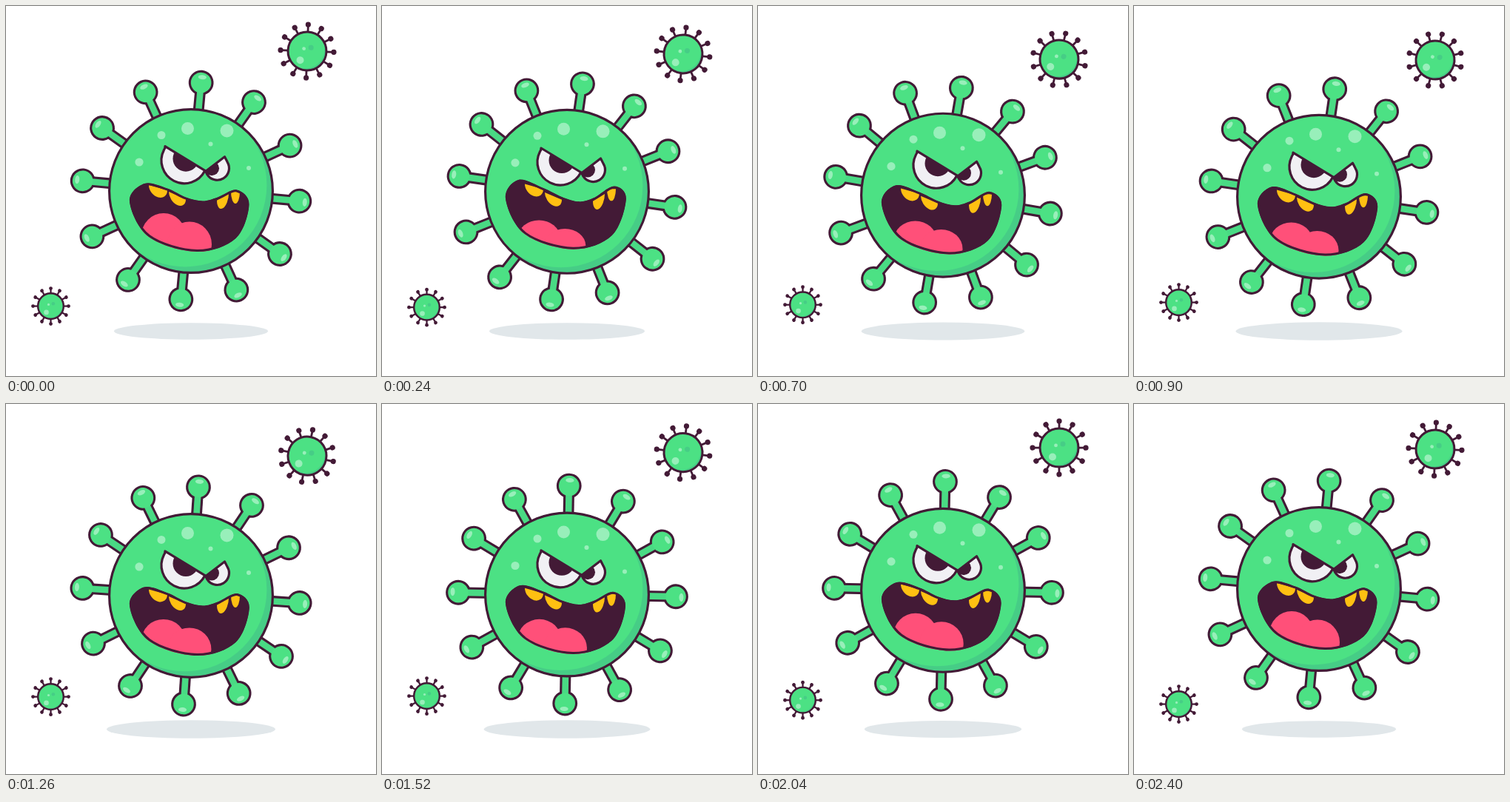
An HTML page with a canvas that plays this animation: 500 px wide and 500 px high, repeating every 2.42 s.

```html
<!DOCTYPE html>
<html lang="en">
<head>
<meta charset="utf-8">
<title>Virus</title>
<style>
  html, body { margin: 0; width: 100%; height: 100%; overflow: hidden; background: #fff; }
  canvas { display: block; width: 500px; height: 500px; }
</style>
</head>
<body>
<canvas id="stage" width="500" height="500"></canvas>
<script>
const ctx = document.getElementById('stage').getContext('2d');
const TAU = Math.PI * 2;
const LOOP = 2420, CYCLE = 2400, STEP = 20;
const INK = '#431a36', GREEN = '#4ce184', STEM = '#49da84', SHADE = '#46cd86', LIGHT = '#98efba';
const WHITE = '#f1f0f4', YELLOW = '#ffc012', PINK = '#ff5079', GROUND = '#e1e7ea';

// 1 at the peak time, -1 half a period later.
const wave = (t, peak, period = CYCLE) => Math.cos(TAU * (t - peak) / period);

function fill(color) {
  ctx.fillStyle = color;
  ctx.fill();
}

function stroke(color, width) {
  ctx.strokeStyle = color;
  ctx.lineWidth = width;
  ctx.stroke();
}

function ellipse(x, y, rx, ry, color) {
  ctx.beginPath();
  ctx.ellipse(x, y, rx, ry, 0, 0, TAU);
  fill(color);
}

const disc = (x, y, r, color) => ellipse(x, y, r, r, color);

function radialLine(from, to, color, width) {
  ctx.beginPath();
  ctx.moveTo(0, -from);
  ctx.lineTo(0, -to);
  stroke(color, width);
}

function scoped(draw) {
  ctx.save();
  draw();
  ctx.restore();
}

function ring(count, draw) {
  for (let i = 0; i < count; i++) scoped(() => {
    ctx.rotate(i * TAU / count);
    draw();
  });
}

// Closed Catmull-Rom curve through the points.
function smoothPath(points) {
  const n = points.length, at = i => points[(i + n) % n];
  ctx.beginPath();
  ctx.moveTo(...at(0));
  for (let i = 0; i < n; i++) {
    const [[ax, ay], [bx, by], [cx, cy], [dx, dy]] = [at(i - 1), at(i), at(i + 1), at(i + 2)];
    ctx.bezierCurveTo(bx + (cx - ax) / 6, by + (cy - ay) / 6,
                      cx - (dx - bx) / 6, cy - (dy - by) / 6, cx, cy);
  }
  ctx.closePath();
}

// Outlined ball with a crescent of shade at the lower right.
function ball(r, shift, width) {
  scoped(() => {
    ctx.beginPath();
    ctx.arc(0, 0, r, 0, TAU);
    ctx.clip();
    disc(0, 0, r, SHADE);
    disc(-shift, -shift, r, GREEN);
  });
  ctx.beginPath();
  ctx.arc(0, 0, r, 0, TAU);
  stroke(INK, width);
}

// Line weight stays nearly the same at every scale.
function smallVirus(x, y, scale, degrees) {
  const weight = 1 / Math.sqrt(scale);
  scoped(() => {
    ctx.translate(x, y);
    ctx.scale(scale, scale);
    ctx.rotate(degrees * TAU / 360);
    ring(12, () => {
      radialLine(24, 36, INK, 2.8 * weight);
      disc(0, -36, 3.6, INK);
    });
    ball(26, 2.5, 3 * weight);
    disc(-9, 12.5, 5, LIGHT);
    disc(-4.5, -3.2, 2.4, LIGHT);
    disc(5, -5, 3.5, SHADE);
  });
}

function spike() {
  radialLine(100, 140, INK, 14.8);
  disc(0, -147, 16.9, INK);
  radialLine(100, 140, STEM, 8.6);
  disc(0, -147, 13.8, GREEN);
  ellipse(1, -154.5, 5.6, 3, LIGHT);
}

// An arc joined to two brow corners; closing the path draws the brow.
function eye(start, [x, y, r, from, to], end, pupil) {
  ctx.beginPath();
  ctx.moveTo(...start);
  ctx.arc(x, y, r, from, to);
  ctx.lineTo(...end);
  ctx.closePath();
  fill(WHITE);
  scoped(() => {
    ctx.clip();
    disc(...pupil, INK);
  });
  ctx.beginPath();
  ctx.moveTo(...start);
  ctx.arc(x, y, r, from, to);
  ctx.lineTo(...end);
  ctx.closePath();
  stroke(INK, 3.2);
}

function eyes() {
  const bridge = [20, -26];
  eye(bridge, [-9, -40.5, 31, 0.47, 3.7], [-35, -59.5], [-7, -43, 17.5]);
  eye([45.5, -45.5], [35.5, -30, 16, -0.55, 2.9], bridge, [28, -30, 10]);
}

// Half an ellipse hanging from a sloping gum line.
function tooth(x, y, halfWidth, depth, slope) {
  scoped(() => {
    ctx.transform(1, slope, 0, 1, x, y);
    ctx.beginPath();
    ctx.ellipse(0, 0, halfWidth, depth, 0, 0, TAU / 2);
    fill(YELLOW);
  });
}

// k runs from 0 (open) to 1 (grinning).
function mouth(k) {
  const lips = [
    [-83, 14 - 5 * k], [-63 - 3 * k, -10 - 6.5 * k], [-32, -3.5 - 1.5 * k],
    [-7, 8.5 - 1.5 * k], [16, 13.5], [36, 8.5], [62 + 2 * k, -1.5 - 6.5 * k],
    [78.5 + 1.5 * k, 18 - 9 * k], [60.5, 64 - 5 * k], [8, 82 - 4.5 * k], [-57, 62 - 5 * k]];
  scoped(() => {
    smoothPath(lips);
    ctx.clip();
    fill(INK);
    for (const [x, y] of [[-37, 60.5], [-2, 72]])
      ellipse(x - k, y + k, 30 - 2 * k, 30.5 - 8.5 * k, PINK);
    tooth(-44.5, -4.5 - 2.5 * k, 12.5, 13, 0.28);
    tooth(-18.5, 6, 11.5, 13, 0.43);
    tooth(43, 8, 8, 15.3, -0.6);
    tooth(60, 1 - 5 * k, 6, 16, 0);
    smoothPath(lips);
    stroke(INK, 6);
  });
}

function bigVirus(t) {
  const grin = (1 - wave(t, 0, 400)) / 2;
  const spots = [[-40, -75.5, 5.5], [-4.5, -84.5, 8.5], [48.5, -81.5, 9],
                 [26.5, -63.5, 3], [-70, -39, 5.6], [78, -31, 3]];
  scoped(() => {
    ctx.translate(250, 254.5 - 4.5 * wave(t, 0));
    scoped(() => {
      ctx.rotate((5 - 5 * wave(t, 1775)) * TAU / 360);
      ring(12, spike);
    });
    ball(110.4, 8, 3.2);
    for (const spot of spots) disc(...spot, LIGHT);
    scoped(() => {
      ctx.translate(0, 1.6 * grin - 0.8);
      eyes();
    });
    mouth(grin);
  });
}

function draw(t) {
  ctx.fillStyle = '#fff';
  ctx.fillRect(0, 0, 500, 500);
  ctx.lineJoin = 'round';
  const spread = 109 - 5 * wave(t, 0);
  ellipse(250, 439.5, spread, spread * 0.108, GROUND);
  const drift = wave(t, 2100);
  smallVirus(407, 66 - 7 * drift, 1, 7.5 - 7.5 * drift);
  smallVirus(60.5, 400.9 + 6.3 * wave(t, 280), 0.667, 0);
  bigVirus(t);
}

const start = performance.now();
function tick() {
  const elapsed = (performance.now() - start) % LOOP;
  draw(Math.floor(elapsed / STEP) * STEP);
  requestAnimationFrame(tick);
}
tick();
</script>
</body>
</html>
```
